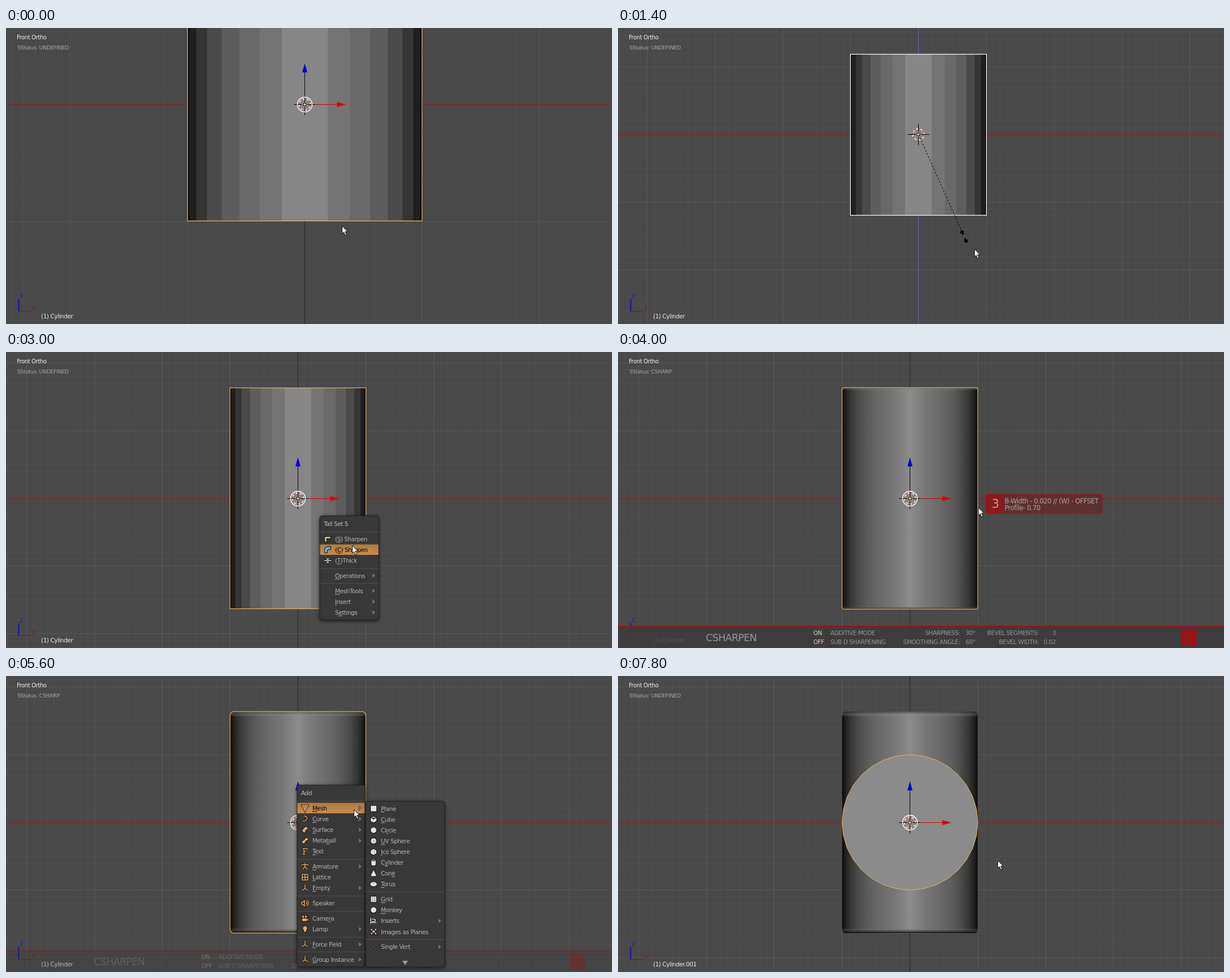
An HTML page with a canvas for the animation above (8000 ms loop, 1070 px wide and 524 px high).

```html
<!DOCTYPE html>
<html lang="en">
<head>
<meta charset="utf-8">
<style>
html, body { margin: 0; width: 100%; height: 100%; overflow: hidden; background: #494949; }
canvas { display: block; }
</style>
</head>
<body>
<canvas width="1070" height="524"></canvas>
<script>
const ctx = document.querySelector('canvas').getContext('2d');
const W = 1070, H = 524, STEP = 200, LOOP = 8000, FACETS = 32;
const ORANGE = '#f0ac5c', GOLD = '#e9a864', PALE = '#e4e4e4', RED = '#941516';
const SHADES = ['#868686', '#747474', '#696969', '#5d5d5d', '#4a4a4a', '#353534', '#1f1f1f', '#0c0c0c'];

// Pointer path: [step, x, y]
const POINTER = [[0, 593, 350], [5, 593, 350], [6, 613, 363], [7, 629, 391], [9, 658, 457], [10, 658, 457],
  [11, 627, 271], [13, 611, 342], [15, 611, 342], [17, 620, 312], [20, 636, 275], [22, 646, 276],
  [24, 611, 273], [25, 609, 258], [26, 607, 238], [28, 614, 236], [29, 650, 242], [32, 670, 326], [40, 670, 326]];

const STAR = 'M0-6V1L-5 4M0 1L5 4';
const BALL = 'M5 0A5 5 0 1 1-5 0A5 5 0 1 1 5 0Z';
// Rows: [label, icon path, icon colour, filled, has submenu]; '_' marks the underlined letter
const TOOLS = [
  ['(_S) Sharpen', 'M-5-4H5V-1H-2V5H-5Z', '#a9d27c', 1],
  ['(_C) Sharpen', 'M-5 5V0Q-4-5 1-5H5V-1H2Q-1-1-1 2V5Z', '#6fb0e8', 1],
  ['(_T)Thick', 'M-6 0H6M-2-4L0-2L2-4M-2 4L0 2L2 4', PALE], null,
  ['_Operations', '', '', 0, 1], null,
  ['_MeshTools', '', '', 0, 1], ['_Insert', '', '', 0, 1], ['S_ettings', '', '', 0, 1]];
const ADD = [
  ['_Mesh', 'M-5-5H5L0 5ZM-2-3H2L0 1Z', GOLD, 0, 1],
  ['_Curve', 'M-2-5C6-5 6 3-4 4', GOLD, 0, 1],
  ['_Surface', 'M-5 1L0-5Q4-6 5-2L1 1L0 5Q-4 5-5 1Z', GOLD, 1, 1],
  ['Meta_ball', 'M-4 5Q-7 2-3 0Q0-1 0-3Q3-7 5-3Q6 0 2 0Q1 1 0 3Q-1 6-4 5Z', GOLD, 1, 1],
  ['_Text', 'M-4 5H0M-2 5V-5M-4-5H4V-3M-2 0H2', GOLD], null,
  ['_Armature', 'M-6-3H6M0-6V0L-4 5M0 0L4 5', GOLD, 0, 1],
  ['_Lattice', 'M-5-5H5V5H-5ZM0-5V5M-5 0H5', GOLD],
  ['_Empty', STAR, GOLD, 0, 1], null,
  ['Speaker', 'M-6-2H-4L-1-5V5L-4 2H-6ZM2-3Q4 0 2 3M4-5Q8 0 4 5', GOLD], null,
  ['Came_ra', 'M-5 0H3V5H-5ZM3 2L6 0V5L3 3M-4-1A2 2 0 1 1-3-1M1-1A2 2 0 1 1 2-1', GOLD, 1],
  ['Lamp', 'M-2 2Q-5-1-3-4Q0-7 3-4Q5-1 2 2V5H-2Z', GOLD, 1, 1], null,
  ['_Force Field', STAR, GOLD, 0, 1], null,
  ['_Group Instance', STAR, GOLD, 0, 1]];
const MESH = [
  ['_Plane', 'M-5-5H5V5H-5Z', PALE, 1],
  ['_Cube', 'M0-5L5-3V3L0 6L-5 3V-3ZM-5-3L0 0L5-3M0 0V6', PALE, 1],
  ['Ci_rcle', BALL, PALE, 1],
  ['_UV Sphere', BALL + 'M-5 0H5M0-5V5', PALE, 1],
  ['_Ico Sphere', 'M0-5L5-2V3L0 6L-5 3V-2ZM-5-2L3 0L0 6', PALE, 1],
  ['C_ylinder', 'M-4-4Q0-7 4-4V4Q0 7-4 4ZM-4-4Q0-1 4-4', PALE, 1],
  ['Con_e', 'M0-6L5 4Q0 7-5 4Z', PALE, 1],
  ['_Torus', 'M6 0Q5 4 0 4T-6 0Q-5-4 0-4T6 0ZM-2-1H2', PALE, 1], null,
  ['_Grid', 'M-5-5H5V5H-5ZM-2-5V5M2-5V5M-5-2H5M-5 2H5', PALE, 1],
  ['_Monkey', BALL, PALE, 1],
  ['Inserts', 'M-5 3H5M-3-3H2Q5-1 2 1H-3M-5-5V5', PALE, 0, 1],
  ['Images as Planes', 'M-5-5H-2V-2H2V-5H5V-2H2V2H5V5H2V2H-2V5H-5V2H-2V-2H-5Z', '#e0b0a0', 1], null,
  ['Single Vert', 'M-1-1H1V1H-1Z', ORANGE, 1, 1]];

const between = (n, from, to) => n >= from && n <= to;
const lerp = (a, b, k) => a + (b - a) * k;
const clamp01 = v => Math.max(0, Math.min(1, v));

function pointerAt(n) {
  const i = Math.max(1, POINTER.findIndex(p => p[0] >= n));
  const [a, b] = [POINTER[i - 1], POINTER[i]];
  const k = clamp01((n - a[0]) / (b[0] - a[0]));
  return [lerp(a[1], b[1], k), lerp(a[2], b[2], k)];
}

function line(x1, y1, x2, y2, color, width = 1) {
  ctx.strokeStyle = color;
  ctx.lineWidth = width;
  ctx.beginPath();
  ctx.moveTo(x1, y1);
  ctx.lineTo(x2, y2);
  ctx.stroke();
}

function shape(points, fill, stroke) {
  ctx.beginPath();
  points.forEach(([x, y]) => ctx.lineTo(x, y));
  ctx.closePath();
  if (fill) { ctx.fillStyle = fill; ctx.fill(); }
  if (stroke) { ctx.strokeStyle = stroke; ctx.lineWidth = 1; ctx.stroke(); }
}

function ring(x, y, r, color, width = 1, dash = []) {
  ctx.setLineDash(dash);
  ctx.strokeStyle = color;
  ctx.lineWidth = width;
  ctx.beginPath();
  ctx.arc(x, y, r, 0, 7);
  ctx.stroke();
  ctx.setLineDash([]);
}

function text(s, x, y, size, color, align = 'left') {
  ctx.font = `${size}px "DejaVu Sans", sans-serif`;
  ctx.letterSpacing = `${-size * .04}px`;
  ctx.textAlign = align;
  ctx.fillStyle = color;
  ctx.fillText(s, x, y);
}

function grid(v, scaling, rotating) {
  ctx.fillStyle = '#494949';
  ctx.fillRect(0, 0, W, H);
  const gap = v.r / 10;
  const snap = p => Math.floor(p) + .5;
  for (const major of [false, true]) {
    const color = major ? '#575757' : '#4e4e4e';
    for (let i = -100; i <= 100; i++) {
      if ((i % 10 === 0) !== major) continue;
      line(snap(v.x + i * gap), 0, snap(v.x + i * gap), H, color);
      line(0, snap(v.y + i * gap), W, snap(v.y + i * gap), color);
    }
  }
  line(0, snap(v.y), W, snap(v.y), rotating ? '#c22a2a' : '#86211f');
  line(snap(v.x), 0, snap(v.x), H, scaling ? '#6a62b8' : v.r > 200 ? '#27273f' : '#2a2a2a');
}

function flatCylinder(v, half, outline) {
  const edge = k => v.r * Math.sin(k * 2 * Math.PI / FACETS);
  const top = Math.round(v.y - half), height = Math.round(half * 2);
  SHADES.forEach((color, k) => {
    ctx.fillStyle = color;
    const a = edge(k), b = edge(k + 1);
    for (const side of [-1, 1]) {
      const from = Math.round(v.x + side * a), to = Math.round(v.x + side * b);
      ctx.fillRect(Math.min(from, to), top, Math.abs(to - from), height);
    }
  });
  ctx.strokeStyle = outline;
  ctx.lineWidth = 1.2;
  ctx.strokeRect(Math.floor(v.x - v.r) + .5, top + .5, Math.round(v.r * 2), height - 1);
}

function smoothCylinder(v, half, bevel, outline) {
  const x = v.x - v.r, top = v.y - half, bottom = v.y + half;
  const body = ctx.createLinearGradient(x, 0, v.x + v.r, 0);
  body.addColorStop(.5, '#8b8b8b');
  SHADES.forEach((color, k) => {
    if (!k) return;
    const s = Math.sin((k + .4) * 2 * Math.PI / FACETS) / 2;
    body.addColorStop(.5 - s, color);
    body.addColorStop(.5 + s, color);
  });
  ctx.save();
  ctx.beginPath();
  ctx.roundRect(x, top, v.r * 2, half * 2, bevel * .8);
  ctx.fillStyle = body;
  ctx.fill();
  ctx.clip();
  const rim = (y, colors) => {
    const g = ctx.createLinearGradient(0, y, 0, y + bevel);
    colors.forEach((c, i) => g.addColorStop(i / (colors.length - 1), c));
    ctx.fillStyle = g;
    ctx.fillRect(x, y, v.r * 2, bevel);
  };
  rim(top, ['#2228', '#7776', '#9992']);
  rim(bottom - bevel, ['#8882', '#3338', '#000d']);
  ctx.restore();
  if (!outline) return;
  ctx.beginPath();
  ctx.roundRect(x, top, v.r * 2, half * 2, bevel * .8);
  ctx.strokeStyle = outline;
  ctx.lineWidth = 1.2;
  ctx.stroke();
}

function endCap(v, outline) {
  const points = Array.from({ length: FACETS }, (_, i) => {
    const a = i * 2 * Math.PI / FACETS;
    return [v.x + v.r * Math.cos(a), v.y + v.r * Math.sin(a)];
  });
  shape(points, '#8b8b8b', outline);
}

function centre(v, gizmo) {
  const x = Math.floor(v.x) + .5, y = Math.floor(v.y) + .5;
  ring(x, y, 10, '#fff', 1.3);
  ring(x, y, 10, '#d22', 1.3, [3.9, 3.9]);
  for (const [dx, dy] of [[1, 0], [-1, 0], [0, 1], [0, -1]]) {
    line(x + dx * 5, y + dy * 5, x + dx * 19, y + dy * 19, '#000');
  }
  if (gizmo) {
    line(x, y - 4, x, y - 58, '#0a0a14');
    line(x + 19, y, x + 60, y, '#d40000');
    shape([[x, y - 73], [x - 4.5, y - 57], [x + 4.5, y - 57]], '#0000e0');
    shape([[x + 73, y], [x + 57, y - 4.5], [x + 57, y + 4.5]], '#e00000');
    ring(x, y, 13, '#fff', 1.3);
  }
  ctx.beginPath();
  ctx.arc(x, y, 2.5, 0, 7);
  ctx.fillStyle = gizmo ? '#f2bd83' : '#e8e0a0';
  ctx.fill();
  ring(x, y, 2.7, '#000');
}

function dragLine(v, [px, py], rotate) {
  const a = Math.atan2(py - v.y, px - v.x);
  ctx.setLineDash([3, 3]);
  line(v.x, v.y, px - 10 * Math.cos(a), py - 10 * Math.sin(a), '#000');
  ctx.setLineDash([]);
  for (const turn of [0, Math.PI]) {
    ctx.save();
    ctx.translate(px, py);
    ctx.rotate(a + turn + (rotate ? Math.PI / 2 : 0));
    shape([[13, 0], [7, -5], [8, -1.5], [4, -2], [4, 2], [8, 1.5], [7, 5]], '#000');
    ctx.restore();
  }
}

function pointer([x, y]) {
  ctx.save();
  ctx.translate(x + .5, y + .5);
  shape([[0, 0], [0, 13.5], [3, 10.8], [5.5, 16.5], [7.8, 15.5], [5.4, 10], [9.3, 9.7]], '#fff', '#111');
  ctx.restore();
}

function icon(path, x, y, color, filled) {
  const p = new Path2D(path);
  ctx.save();
  ctx.translate(x, y);
  ctx.strokeStyle = '#111';
  ctx.lineWidth = filled ? 2 : 3.2;
  ctx.stroke(p);
  if (filled) {
    ctx.fillStyle = color;
    ctx.fill(p);
    ctx.strokeStyle = '#4446';
    ctx.lineWidth = .8;
  } else {
    ctx.strokeStyle = color;
    ctx.lineWidth = 1.5;
  }
  ctx.stroke(p);
  ctx.restore();
}

function menu(title, rows, x, first, width, mouse, forced = -1, bottom = 0) {
  const top = first - (title ? 41 : 13);
  let y = first;
  const placed = rows.map(row => {
    const at = y;
    y += row ? 19.1 : 7.7;
    return at;
  });
  const end = bottom || y - 19.1 + 13;
  const rule = at => {
    line(x, at, x + width, at, '#4d4d4d');
  };
  ctx.save();
  ctx.shadowColor = '#000b';
  ctx.shadowBlur = 7;
  ctx.shadowOffsetY = 2;
  ctx.beginPath();
  ctx.roundRect(x, top, width, end - top, 4);
  ctx.fillStyle = '#383838';
  ctx.fill();
  ctx.restore();
  ctx.strokeStyle = '#202020';
  ctx.lineWidth = 1;
  ctx.stroke();
  if (title) {
    text(title, x + 7, first - 23, 10.4, '#c0c0c0');
    rule(first - 12.5);
  }
  rows.forEach((row, i) => {
    const cy = placed[i];
    if (!row) return rule(Math.round(cy - 5.7) + .5);
    const [label, path, color, filled, more] = row;
    const inside = between(mouse[0], x, x + width) && Math.abs(mouse[1] - cy) < 9.55;
    const active = forced < 0 ? inside : forced === i;
    if (active) {
      const g = ctx.createLinearGradient(0, cy - 9, 0, cy + 9);
      g.addColorStop(0, '#b27a39');
      g.addColorStop(1, '#c78e50');
      ctx.fillStyle = g;
      ctx.fillRect(x + .5, cy - 9.5, width - 1, 18.5);
    }
    if (path) icon(path, x + 14, cy, color, filled);
    const ink = active ? '#000' : '#b5b5b5', tx = x + 27;
    const mark = label.indexOf('_'), plain = label.replace('_', '');
    text(plain, tx, cy + 4, 10.4, ink);
    if (mark >= 0) {
      const left = tx + ctx.measureText(plain.slice(0, mark)).width;
      line(left, cy + 6, left + ctx.measureText(plain[mark]).width, cy + 6, ink);
    }
    const ax = x + width - 11;
    if (more) shape([[ax, cy - 4], [ax + 5, cy], [ax, cy + 4]], '#777', '#4a4a4a');
  });
  if (bottom) {
    const mx = x + width / 2;
    shape([[mx - 5, end - 11], [mx + 5, end - 11], [mx, end - 3]], '#999');
  }
}

function widthPanel([mx, my], bevel) {
  const x = Math.round(mx) + 13, y = Math.round(my) - 23;
  ctx.fillStyle = '#701c1c88';
  ctx.fillRect(x, y, 206, 34);
  ctx.fillStyle = '#8e1a1a';
  ctx.fillRect(x, y, 31, 34);
  ctx.strokeStyle = '#9c1717';
  ctx.lineWidth = 1.5;
  ctx.strokeRect(x + .5, y + .5, 205, 33);
  text('3', x + 17, y + 24, 21, '#a9a0a0', 'center');
  text(`B-Width - ${(bevel * .005).toFixed(3)} // (W) - OFFSET`, x + 33.5, y + 16, 11.5, '#aaa2a2');
  text('Profile- 0.70', x + 33.5, y + 28, 11.5, '#aaa2a2');
}

function statusBar(alpha) {
  const grey = '#959595';
  ctx.save();
  ctx.globalAlpha = alpha;
  ctx.fillStyle = '#3c3a3add';
  ctx.fillRect(0, 486, W, 38);
  line(0, 486, W, 486, RED, 2.4);
  text('CSHARPEN', 155, 512, 17.5, grey);
  text('ON', 345, 501, 10.4, '#c4dec0');
  text('OFF', 345, 517, 10.4, '#e4c0c0');
  const cells = [
    ['ADDITIVE MODE', 'SHARPNESS:', '30°', 'BEVEL SEGMENTS:', '3'],
    ['SUB D SHARPENING', 'SMOOTHING ANGLE:', '60°', 'BEVEL WIDTH:', '0.02']];
  cells.forEach((row, i) => row.forEach((s, j) =>
    text(s, [375, 604, 631, 743, 773][j], 501 + i * 16, 10.4, grey, j ? 'right' : 'left')));
  ctx.fillStyle = RED;
  ctx.fillRect(994, 492, 28, 28);
  ctx.restore();
}

function labels(status, name) {
  text('Front Ortho', 19, 20, 10, '#f2f2f2');
  text(`SStatus: ${status}`, 20, 38, 9.4, '#a6a6a6');
  text(`(1) ${name}`, 62, 514, 10.4, '#ececec');
  line(22.5, 502, 22.5, 480, '#1010b4', 2);
  line(22, 501.5, 44, 501.5, '#8c1818', 1.3);
  text('Z', 24, 478, 9, '#1c1cc0');
  text('X', 46, 500, 9, '#8c1818');
}

function draw(n) {
  const zoom = 1.2 ** Math.max(0, Math.min(3, n - 3));
  const pan = clamp01((n - 10) / 3);
  const v = { x: 535 - 7.5 / zoom - 15.2 * pan, y: 262 - 126.7 / zoom + 70.5 * pan, r: 207 / zoom };
  const scaling = between(n, 6, 9), rotating = between(n, 36, 38);
  const stretch = n < 7 ? 1 : n < 10 ? 1.195 + (n - 7) * .21 : 1.636;
  const bevel = Math.max(4, Math.min(8, 4 + (n - 20) * 1.3));
  const half = v.r * stretch, added = n >= 34;
  const mouse = pointerAt(n);

  grid(v, scaling && n > 6, rotating && n > 36);
  if (n < 16) flatCylinder(v, half, scaling ? '#fff' : ORANGE);
  else smoothCylinder(v, half, bevel, added ? null : ORANGE);
  if (added) {
    const outline = rotating ? '#fff' : ORANGE;
    if (n < 38) flatCylinder(v, v.r, outline);
    else endCap(v, outline);
  }
  centre(v, !scaling && !rotating);
  if (scaling) dragLine(v, [mouse[0] - 18, mouse[1] - 22], false);
  if (rotating) dragLine(v, mouse, true);

  labels(between(n, 16, 33) ? 'CSHARP' : 'UNDEFINED', added ? 'Cylinder.001' : 'Cylinder');
  const barAlpha = Math.min(clamp01((n - 15) / 2), clamp01((29 - n) / 3));
  if (barAlpha) statusBar(barAlpha);
  if (between(n, 16, 22)) widthPanel(mouse, bevel);
  if (between(n, 14, 15)) menu('Tall Set 5', TOOLS, 554, 331, 104, mouse);
  if (between(n, 24, 33)) menu('Add', ADD, 514, 234, 120, mouse, n >= 28 ? 0 : -1);
  if (between(n, 28, 33)) menu('', MESH, 635, 234.7, 139.5, mouse, -1, 515);
  pointer(mouse);
}

const start = performance.now();
function tick() {
  draw(Math.floor((performance.now() - start) % LOOP / STEP));
  requestAnimationFrame(tick);
}
tick();
</script>
</body>
</html>
```
